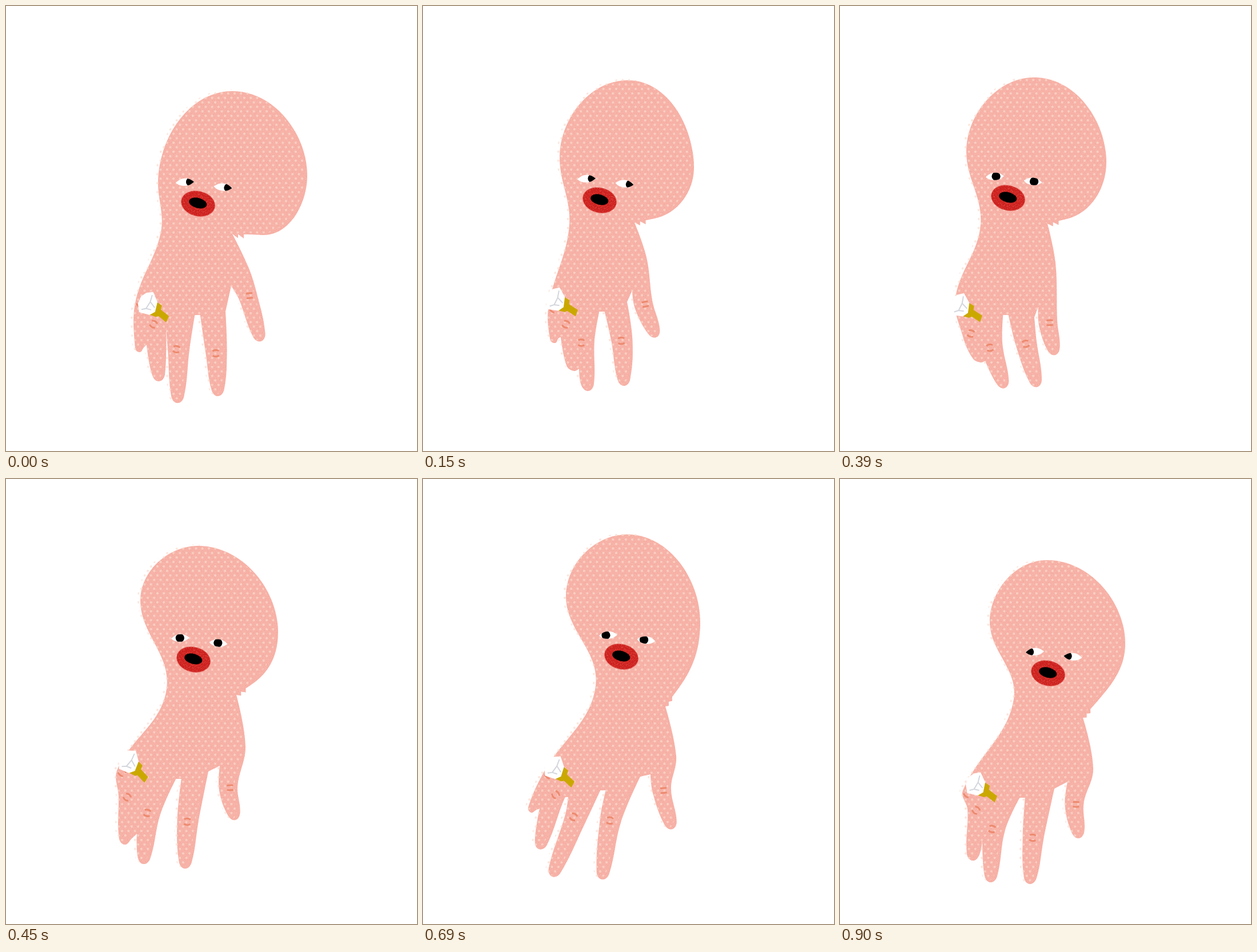
Animation, 719 px wide and 779 px high, one loop 1.05 s. Source, as an HTML page:

```html
<!DOCTYPE html>
<html lang="en">
<head>
<meta charset="utf-8">
<title>Wobbling hand</title>
<style>
  html, body { margin: 0; width: 100%; height: 100%; overflow: hidden; background: #fff; }
  svg { display: block; width: 100%; height: 100%; }
</style>
</head>
<body>
<svg viewBox="0 0 719 779">
  <defs>
    <pattern id="dots" width="11.25" height="15.7" patternUnits="userSpaceOnUse" patternTransform="translate(329 128)">
      <g fill="#f9dccf">
        <circle cx="2.8" cy="4" r="2.1"/>
        <circle cx="8.4" cy="11.85" r="2.1"/>
      </g>
    </pattern>
    <filter id="skinGrain" x="0" y="0" width="1" height="1" color-interpolation-filters="sRGB">
      <feTurbulence type="fractalNoise" baseFrequency=".75" numOctaves="2" seed="4"/>
      <feColorMatrix values="0 0 0 0 .93  0 0 0 0 .6  0 0 0 0 .56  2 0 0 0 -1"/>
      <feComposite in2="SourceGraphic" operator="in" result="grain"/>
      <feMerge><feMergeNode in="SourceGraphic"/><feMergeNode in="grain"/></feMerge>
    </filter>
    <filter id="lipGrain" x="0" y="0" width="1" height="1" color-interpolation-filters="sRGB">
      <feTurbulence type="fractalNoise" baseFrequency=".6" numOctaves="2" seed="9"/>
      <feColorMatrix values="0 0 0 0 .9  0 0 0 0 .32  0 0 0 0 .28  4 0 0 0 -2"/>
      <feComposite in2="SourceGraphic" operator="in" result="grain"/>
      <feMerge><feMergeNode in="SourceGraphic"/><feMergeNode in="grain"/></feMerge>
    </filter>
    <path id="almond" d="M-16,.5 C-11,-4 -6,-6.5 0,-6.5 C7,-6.5 11,-4 16,0 C10,5 6,6.5 0,6.5 C-7,6.5 -12,5 -16,.5Z"/>
    <clipPath id="lids"><use href="#almond"/></clipPath>
    <g id="eye">
      <use href="#almond" fill="#fff"/>
      <g clip-path="url(#lids)"><circle id="pupil" r="7.6"/></g>
    </g>
  </defs>
  <path id="skin" fill="#f8b4a9" filter="url(#skinGrain)"/>
  <path id="spots" fill="url(#dots)" opacity=".7" transform="translate(-5 -2.5)"/>
  <g id="creases" fill="none" stroke="#ed8a6f" stroke-width="3"></g>
  <g id="ring">
    <path fill="#cba800" d="M6.5,-11.5 14.5,-6 13,1 27.5,12 23,23 9,12.5 4.5,14 -6.5,10.5Z"/>
    <path fill="#fff" d="M-13.5,-27.5 -1.5,-29.5 6.5,-12 3,5.5 -6.5,11 -25,7 -27.5,-8.5 -22.5,-21Z"/>
    <path fill="none" stroke="#d3d6dc" stroke-width="2" d="M-3,-24 -6,-12 2,-2M-6,-12 -13,0 -21,2M-13,0 -4,2"/>
  </g>
  <g id="face">
    <use href="#eye" transform="translate(313 308.3) rotate(-2)"/>
    <use href="#eye" transform="translate(379.5 317) rotate(7)"/>
    <g transform="translate(336 346) rotate(14)">
      <ellipse rx="30" ry="21.8" fill="#cb1f1d" filter="url(#lipGrain)"/>
      <ellipse cx="-.6" cy="-1" rx="15.8" ry="9"/>
    </g>
  </g>
</svg>
<script>
const HOLD = 150;
const $ = id => document.getElementById(id);

// Thumb to ring finger: half width, sideways shift and tilt of the knuckle creases.
const build = [
  { width: 16.5, shift: 3, tilt: 10 },
  { width: 18.5, shift: -1, tilt: 0 },
  { width: 19, shift: -4, tilt: 8 },
  { width: 16, shift: -1, tilt: 35 }
];

// head: left, top, right, jaw; arm: nape, elbow; fingers: knuckle, tip;
// gaps: between the fingers; cuff: outer side of the palm, neck; ring: x, y, angle
const poses = [
  {
    head: [[266, 310], [396, 149], [527, 297], [448, 401]], arm: [[396, 399], [424, 457]],
    fingers: [[423, 508, 446, 587], [368, 608, 371, 683], [302, 601, 300, 695], [259, 557, 268, 657]],
    gaps: [[394, 490], [384, 535], [335, 541], [280, 562], [246, 593]], little: [234, 606],
    cuff: [[227, 515], [271, 395]], face: [0, 0], look: 9.5, ring: [258, 530, 2]
  },
  {
    head: [[239, 265], [358, 130], [474, 283], [405, 372]], arm: [[370, 379], [391, 440]],
    fingers: [[386, 523, 408, 580], [348, 586, 352, 665], [281, 589, 289, 674], [251, 557, 264, 639]],
    gaps: [[366, 498], [357, 518], [313, 535], [273, 635], [241, 580]], little: [231, 590],
    cuff: [[220, 524], [256, 383]], face: [-27, -6], look: 10, ring: [242.5, 522, -4]
  },
  {
    head: [[221, 255], [340, 125], [466, 273], [396, 373]], arm: [[363, 381], [377, 450]],
    fingers: [[364, 555, 376, 611], [326, 591, 345, 667], [266, 597, 288, 669], [230, 573, 246, 624]],
    gaps: [[347, 526], [340, 545], [290, 541], [254, 621]],
    cuff: [[202, 510], [246, 382]], face: [-42, -10], look: 2, ring: [220.5, 532, -4]
  },
  {
    head: [[235, 212], [336, 117], [476, 268], [432, 358]], arm: [[403, 378], [419, 468]],
    fingers: [[389, 541, 401, 597], [318, 600, 313, 682], [251, 585, 240, 674], [213, 557, 208, 640]],
    gaps: [[374, 502], [354, 512], [302, 525], [229, 621]],
    cuff: [[195, 508], [281, 367]], face: [-8, -30], look: -.7, ring: [223.5, 505, 10]
  },
  {
    head: [[250, 205], [357, 97], [485, 250], [448, 365]], arm: [[424, 398], [443, 485]],
    fingers: [[418, 546, 436, 613], [328, 598, 313, 701], [267, 593, 226, 696], [233, 553, 203, 648]],
    gaps: [[398, 517], [380, 521], [315, 545], [254, 557], [204, 577]], little: [189, 584],
    cuff: [[212, 512], [302, 362]], face: [11, -35], look: -4, ring: [239, 515, 6]
  },
  {
    head: [[263, 225], [369, 107], [501, 258], [457, 368]], arm: [[432, 400], [443, 465]],
    fingers: [[425, 529, 436, 604], [340, 607, 321, 695], [277, 603, 239, 680], [247, 561, 224, 638]],
    gaps: [[397, 495], [374, 536], [327, 534], [271, 556], [230, 561]], little: [215, 567],
    cuff: [[227, 496], [310, 370]], face: [24, -25], look: -9.5, ring: [253.5, 524.5, 0]
  },
  {
    head: [[262, 250], [362, 142], [499, 288], [452, 387]], arm: [[425, 418], [443, 507]],
    fingers: [[410, 570, 418, 629], [338, 628, 332, 709], [270, 613, 263, 706], [239, 580, 232, 668]],
    gaps: [[398, 530], [375, 542], [319, 558], [249, 631]],
    cuff: [[215, 545], [304, 385]], face: [28, -6], look: -9.5, ring: [247.5, 543, 0]
  }
];

const add = (p, v, k = 1) => [p[0] + v[0] * k, p[1] + v[1] * k];
const dot = (a, b) => a[0] * b[0] + a[1] * b[1];
const toward = (a, b) => {
  const d = add(b, a, -1);
  return add([0, 0], d, 1 / (Math.hypot(...d) || 1));
};
const across = ([x, y]) => [y, -x];
const node = (p, dir) => ({ p, dir });
const corner = p => node(p, [0, 0]);

// Closed curve through the nodes; without a direction of its own a node follows its neighbours.
function outline(nodes) {
  const n = nodes.length;
  const at = i => nodes[(i + n) % n];
  const dir = i => at(i).dir || toward(at(i - 1).p, at(i + 1).p);
  const text = p => p.map(v => v.toFixed(1)).join();
  let d = 'M' + text(nodes[0].p);
  for (let i = 0; i < n; i++) {
    const p = at(i).p, q = at(i + 1).p;
    const reach = .37 * Math.hypot(q[0] - p[0], q[1] - p[1]);
    d += `C${text(add(p, dir(i), reach))} ${text(add(q, dir(i + 1), -reach))} ${text(q)}`;
  }
  return d + 'Z';
}

// Down one side, round the tip and up the other, keeping what lies beyond the gaps.
function finger(knuckle, tip, width, round, before, after) {
  const d = toward(knuckle, tip), side = across(d);
  const end = add(tip, d, -round);
  const beyond = gap => p => dot(add(p, gap, -1), d) > 0;
  const right = [add(knuckle, side, width), add(end, side, round)].filter(beyond(before));
  const left = [add(end, side, -round), add(knuckle, side, -width)].filter(beyond(after));
  return [...right, tip, ...left].map(p => node(p));
}

function body({ head: [left, top, right, jaw], arm: [nape, elbow], fingers, gaps, little, cuff: [palm, neck] }) {
  const chin = toward(jaw, nape);
  const frill = [20, 10].flatMap(k => {
    const root = add(nape, chin, -k);
    return [corner(root), corner(add(root, [0, 7]))];
  });
  const [inner, outer, web, ...slots] = gaps;
  const webs = [add(web, [4.7, 0]), add(web, [-4.7, 0])];
  const before = [nape, outer, webs[1], slots[0]];
  const after = [inner, webs[0], slots[0], slots[1] || palm];
  const hand = fingers.flatMap(([kx, ky, tx, ty], i) => [
    ...(i ? [corner(before[i])] : []),
    ...finger([kx, ky], [tx, ty], build[i].width, 11, before[i], after[i]),
    ...(i < 2 ? [corner(after[i])] : [])
  ]);
  if (little) hand.push(corner(slots[1]), ...finger(palm, little, 0, 7.5, slots[1], palm));
  return [
    node(left, [0, -1]), node(top, [1, 0]), node(right, [0, 1]), node(jaw, chin),
    ...frill, corner(nape), node(elbow), ...hand, node(palm), node(neck)
  ];
}

function crease([x, y], turn, bend) {
  return `<path transform="translate(${x} ${y}) rotate(${turn})"
    d="M-5.5,-4q5.5,${-bend} 11,0M-5.5,4q5.5,${bend} 11,0"/>`;
}

function creases({ fingers, cuff: [palm] }) {
  const marks = fingers.map(([kx, ky, tx, ty], i) => {
    const { shift, tilt } = build[i];
    const side = across(toward([kx, ky], [tx, ty]));
    const turn = Math.atan2(side[1], side[0]) * 180 / Math.PI + tilt;
    return crease(add([kx, ky], side, shift), turn, i ? 3.5 : .5);
  });
  return crease(add(palm, [8, 6]), 40, 3) + marks.join('');
}

let shown = -1;
function draw(time) {
  const i = Math.floor(time / HOLD) % poses.length;
  if (i === shown) return;
  shown = i;
  const pose = poses[i], [x, y, turn] = pose.ring;
  const d = outline(body(pose));
  $('skin').setAttribute('d', d);
  $('spots').setAttribute('d', d);
  $('creases').innerHTML = creases(pose);
  $('ring').setAttribute('transform', `translate(${x} ${y}) rotate(${turn})`);
  $('face').setAttribute('transform', `translate(${pose.face})`);
  $('pupil').setAttribute('cx', pose.look);
}

const start = performance.now();
function tick() {
  draw(performance.now() - start);
  requestAnimationFrame(tick);
}
tick();
</script>
</body>
</html>
```
